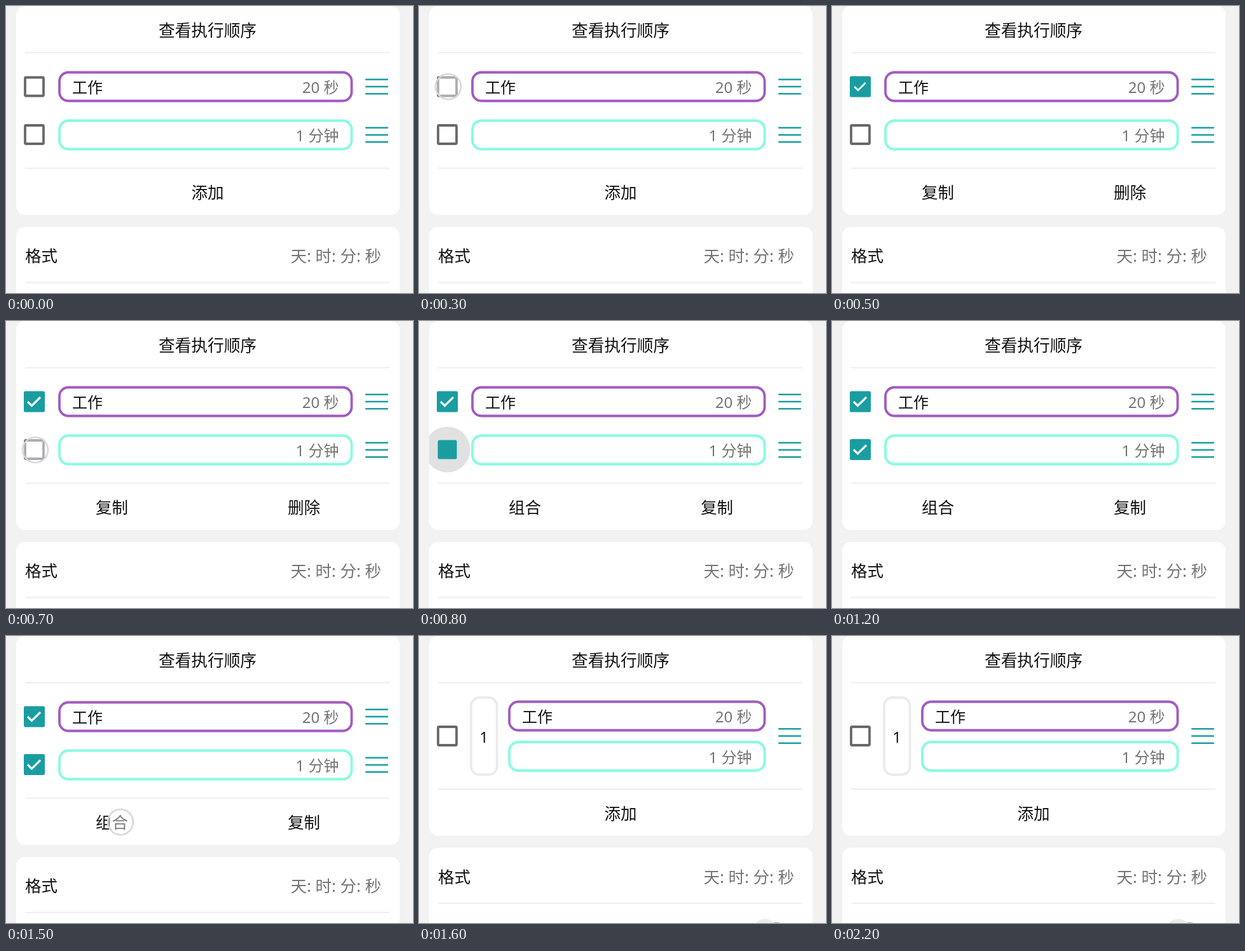
Write an HTML page with a canvas that moves like this. It is 640x452 px and loops after 2.4 s.

```html
<!DOCTYPE html>
<html lang="zh-CN">
<head>
<meta charset="utf-8">
<title>执行顺序</title>
<style>
  html, body { margin: 0; width: 640px; height: 452px; overflow: hidden; background: #f2f2f2; }
  canvas { display: block; }
</style>
</head>
<body>
<canvas id="stage" width="640" height="452"></canvas>
<script>
const ctx = document.getElementById('stage').getContext('2d');
const LOOP = 2400;
const TEAL = '#1a9da1', INK = '#111', GRAY = '#747474', RULE = '#eeeeee';
const PURPLE = '#a15bc0', MINT = '#86fbe1';

// Text is placed by the vertical centre of its characters.
function label(str, x, y, size = 25.5, align = 'center', color = INK) {
  ctx.font = `${size}px "Noto Sans", "Noto Sans CJK SC", sans-serif`;
  ctx.textAlign = align;
  ctx.fillStyle = color;
  ctx.fillText(str, x, y + size * 0.38);
}

function box(x, y, w, h, r, fill, stroke, width = 4) {
  ctx.beginPath();
  ctx.roundRect(x, y, w, h, r);
  if (fill) { ctx.fillStyle = fill; ctx.fill(); }
  if (stroke) { ctx.strokeStyle = stroke; ctx.lineWidth = width; ctx.stroke(); }
}

function disc(x, y, r, fill) {
  ctx.beginPath();
  ctx.arc(x, y, r, 0, Math.PI * 2);
  ctx.fillStyle = fill;
  ctx.fill();
}

function rule(y) {
  ctx.fillStyle = RULE;
  ctx.fillRect(30, y - 1, 573, 2);
}

function handle(y) {
  ctx.fillStyle = TEAL;
  for (const d of [-11.3, 0, 11.3]) box(565, y + d - 1.3, 36, 2.6, 1, TEAL);
}

// tick: undefined = empty box, 0 = filled without a mark, 1 = full mark
function checkbox(y, tick) {
  if (tick === undefined) return box(30, y - 14.5, 29, 29, 1.5, null, '#696969', 3.8);
  if (tick === 0) {
    ctx.save();
    ctx.beginPath();
    ctx.rect(16, 0, 603, 452);
    ctx.clip();
    disc(44.5, y, 36, '#e1e1e1');
    ctx.restore();
    return box(29.5, y - 15, 30, 30, 2.5, TEAL);
  }
  box(28, y - 16.5, 33, 33, 2.5, TEAL);
  ctx.save();
  ctx.translate(44, y);
  ctx.scale(tick, tick);
  ctx.beginPath();
  ctx.moveTo(-10, 0);
  ctx.lineTo(-3.5, 6.5);
  ctx.lineTo(10, -7);
  ctx.strokeStyle = '#f4ffff';
  ctx.lineWidth = 3.2;
  ctx.stroke();
  ctx.restore();
}

function step(x, y, color, name, time) {
  box(x + 2, y - 22.5, 543 - x - 1.5, 45, 14, '#fff', color, 3.8);
  label(name, x + 22, y + 1, 24, 'left');
  label(time, 523.5, y + 1, 24, 'right', GRAY);
}

function touch(x, y) {
  disc(x, y, 20, 'rgba(255,255,255,.45)');
  ctx.strokeStyle = '#d9d5e2';
  ctx.lineWidth = 2.6;
  ctx.stroke();
}

function page(shift) {
  ctx.fillStyle = '#f2f2f2';
  ctx.fillRect(0, 0, 640, 452);
  box(16, 0, 603, 329 - shift, 14, '#fff');
  box(16, 348 - shift, 603, 200, 14, '#fff');
  label('查看执行顺序', 317, 38, 25.7);
  rule(73.5);
  rule(255.5 - shift);
  label('格式', 30, 393.5 - shift, 25.5, 'left');
  label('天: 时: 分: 秒', 590, 393.5 - shift, 25.5, 'right', GRAY);
  rule(435.5 - shift);
}

function separate(t) {
  page(0);
  const first = t < 400 ? undefined : t < 500 ? 0 : t < 600 ? 0.87 : 1;
  const second = t < 800 ? undefined : t < 900 ? 0 : t < 1000 ? 0.87 : 1;
  checkbox(127, first);
  checkbox(202.5, second);
  step(82, 127, PURPLE, '工作', '20 秒');
  step(82, 203, MINT, '', '1 分钟');
  handle(127);
  handle(203);

  if (t < 400) {
    label('添加', 317, 293.5);
  } else {
    const [left, right] = t < 800 ? ['复制', '删除'] : ['组合', '复制'];
    label(left, 166.5, 293.5);
    label(right, 468.5, 293.5);
  }

  if (t >= 300 && t < 400) touch(46, 127);
  if (t >= 700 && t < 800) touch(46, 203);
  if (t >= 1400) touch(180, 293);
}

function grouped() {
  page(14.5);
  checkbox(157.5);
  box(82, 97, 40.5, 121.5, 13, '#fff', '#ebebeb', 3.8);
  label('1', 102, 158.5, 24);
  step(140, 126, PURPLE, '工作', '20 秒');
  step(140, 189.5, MINT, '', '1 分钟');
  handle(157.5);
  label('添加', 317, 279);
  box(535, 451, 43, 30, 15, '#aaa');
  disc(544.5, 465, 19.5, '#ebebeb');
}

function frame(now) {
  const t = now % LOOP;
  if (t < 1600) separate(t);
  else grouped();
  requestAnimationFrame(frame);
}
requestAnimationFrame(frame);
</script>
</body>
</html>
```
